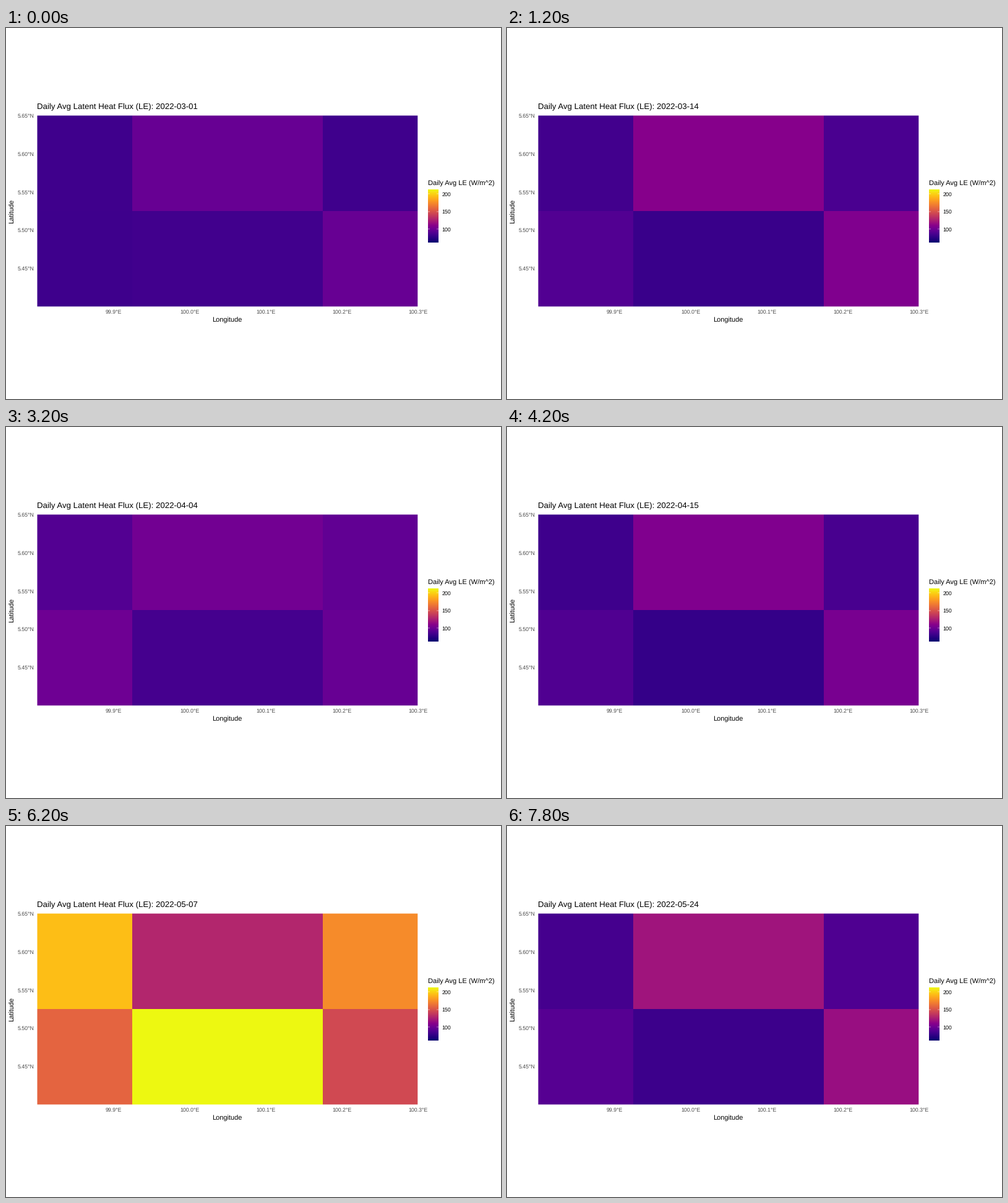
Write a matplotlib script that moves like this. It is 800 by 600 pixels and loops after 8 s.

```python
import numpy as np
import matplotlib.pyplot as plt
from matplotlib.animation import FuncAnimation
from matplotlib.colors import ListedColormap
from matplotlib.patches import Rectangle

W, H, DPI = 800, 600, 100
FRAMES, INTERVAL = 40, 200
DAYS_PER_FRAME = 2.1475
START = np.datetime64("2022-03-01")

LEFT, TOP, WIDTH, HEIGHT = 50.5, 141.6, 614.8, 308.8
BAR_TOP, BAR_BOTTOM = 261, 347
FLUX_MIN, FLUX_MAX = 62, 213

plt.rcParams["font.family"] = "Liberation Sans"
plt.rcParams["text.hinting"] = "none"

# Key moments on a 0..1 flux scale: frame, land level, land spread, sea level
KEYS = np.array([
    (0, 0.14, -0.01, 0.235),
    (6, 0.12, 0.06, 0.315),
    (10, 0.062, 0.085, 0.35),
    (16, 0.15, 0.10, 0.265),
    (25, 0.075, 0.045, 0.325),
    (31, 1.0, -0.36, 0.445),
    (39, 0.125, 0.07, 0.385),
])
PEAK = KEYS[:, 1].argmax()

# How much land, spread and sea each cell takes, row by row
MIX = np.array([
    (1, 0.35, 0), (0, 0, 1), (1, 0.7, 0),
    (1, 1, 0), (1, 0, 0), (0, -0.3, 1),
])


def deep_plasma():
    """Plasma with darker, more saturated low tones."""
    r, g, b, _ = plt.get_cmap("plasma")(np.linspace(0, 1, 256)).T
    g = np.clip((g - 0.075) / 0.925, 0, 1)
    return ListedColormap(np.column_stack([r ** 1.2, g, b ** 1.32]))


HEAT = deep_plasma()
fig = plt.figure(figsize=(W / DPI, H / DPI), dpi=DPI, facecolor="white")
ax = fig.add_axes([0, 0, 1, 1])


def label(x, y, text, size, color="black", **kw):
    return ax.text(x, y, text, fontsize=size * 72 / DPI, color=color,
                   va="baseline", **kw)


def flux_at(i):
    k = min(np.searchsorted(KEYS[:, 0], i, side="right"), len(KEYS) - 1)
    a, b = KEYS[k - 1], KEYS[k]
    u = (i - a[0]) / (b[0] - a[0])
    # The heat burst is short, so it rises late and falls early
    if k == PEAK:
        u = u ** 3
    elif k - 1 == PEAK:
        u = 1 - (1 - u) ** 3
    return MIX @ (a + (b - a) * u)[1:]


def draw_axes():
    for n in range(5):
        label(45.3, TOP + 3.5 + HEIGHT / 5 * n, f"{5.65 - 0.05 * n:.2f}°N",
              8.8, "#4d4d4d", ha="right")
        label(LEFT + 0.2 + WIDTH / 5 * (n + 1), 462.2,
              f"{99.9 + 0.1 * n:.1f}°E", 8.8, "#4d4d4d", ha="center")
    label(357.7, 475.4, "Longitude", 11, ha="center")
    label(13.3, 296, "Latitude", 11, ha="center", rotation=90,
          rotation_mode="anchor")


def draw_legend():
    label(681.8, 255, "Daily Avg LE (W/m^2)", 11.15)
    ramp = np.linspace(1, 0, 300)[:, None]
    ax.imshow(ramp, cmap=HEAT, vmin=0, vmax=1, aspect="auto",
              extent=[682, 699, BAR_BOTTOM, BAR_TOP])
    scale = (BAR_BOTTOM - BAR_TOP) / (FLUX_MAX - FLUX_MIN)
    for value in (100, 150, 200):
        y = BAR_BOTTOM - scale * (value - FLUX_MIN)
        label(704.8, y + 3.2, str(value), 8.8)
        for x in (682, 695.6):
            ax.plot([x, x + 3.4], [y, y], color="white", lw=0.35,
                    solid_capstyle="butt")


def make_cells():
    xs = [LEFT, *np.round(LEFT + WIDTH * np.array([0.25, 0.75])),
          LEFT + WIDTH]
    ys = [TOP, round(TOP + HEIGHT / 2), TOP + HEIGHT]
    return [ax.add_patch(Rectangle((x0, y0), x1 - x0, y1 - y0, lw=0,
                                   snap=False))
            for y0, y1 in zip(ys, ys[1:]) for x0, x1 in zip(xs, xs[1:])]


draw_axes()
draw_legend()
cells = make_cells()
title = label(50.3, 131, "", 13.2)
ax.set_xlim(0, W)
ax.set_ylim(H, 0)
ax.axis("off")


def update(i):
    day = START + int(round(i * DAYS_PER_FRAME))
    title.set_text(f"Daily Avg Latent Heat Flux (LE): {day}")
    for cell, value in zip(cells, flux_at(i)):
        cell.set_facecolor(HEAT(float(value)))
    return [title, *cells]


anim = FuncAnimation(fig, update, frames=FRAMES, interval=INTERVAL,
                     init_func=lambda: update(0), repeat=True,
                     repeat_delay=0, blit=False)
plt.show()
```
